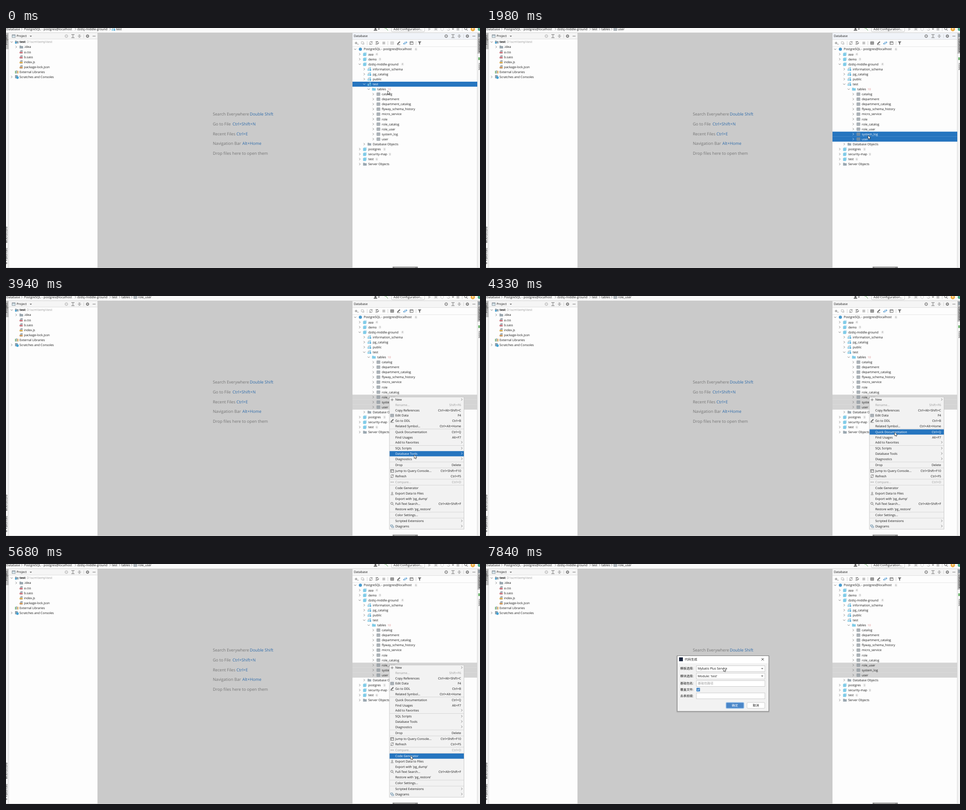
Animation of 1052 by 532 pixels, one loop 8 s. Source, as an HTML page:

```html
<!DOCTYPE html>
<html lang="en">
<head>
<meta charset="utf-8">
<title>Database tool window</title>
<style>
html, body { margin: 0; width: 100%; height: 100%; overflow: hidden; background: #fff; }
svg { display: block; width: 1052px; height: 532px; }
text { font: 6.95px "Open Sans", "Noto Sans CJK SC", "Noto Sans CJK", sans-serif; fill: #161616; text-rendering: geometricPrecision; white-space: pre; }
.hint { font-size: 9.1px; fill: #757575; }
.key { fill: #2f6cab; }
.gray { fill: #9a9a9a; }
.end { text-anchor: middle; }
.right { text-anchor: end; }
.bg { fill: none; }
.sel .bg { fill: #2675bf; }
.dim .bg { fill: #d4d4d4; }
.sel text { fill: #fff; }
.sel .arrow { stroke: #d5e5f4; }
.sel .pic { stroke: #c3d4e4; }
.off text { fill: #9a9a9a; }
.arrow { fill: none; stroke: #6e6e6e; stroke-width: .9; }
.pic { fill: none; stroke: #6e6e6e; stroke-width: 1; }
</style>
</head>
<body>
<svg id="stage" viewBox="0 0 1052 532" xmlns="http://www.w3.org/2000/svg"></svg>
<script>
const LOOP = 8000;
const BLUE = '#3d8fc9', SKY = '#7fcbe8', GRAY = '#6e6e6e', PALE = '#c4c4c4';

// Drawing helpers: each returns SVG markup
const rect = (x, y, w, h, fill, more = '') => `<rect x="${x}" y="${y}" width="${w}" height="${h}" fill="${fill}" ${more}/>`;
const text = (x, y, s, cls = '', more = '') => `<text x="${x}" y="${y + 2.45}" class="${cls}" ${more}>${s}</text>`;
const pic = (x, y, d, color = '', more = '') =>
  `<path class="pic" transform="translate(${x} ${y})" d="${d}" ${color && `style="stroke:${color}"`} ${more}/>`;
const solid = (x, y, d, fill) => `<path transform="translate(${x} ${y})" d="${d}" fill="${fill}"/>`;
const vline = (x, y, h, fill = '#d2d2d2') => rect(x, y, 1, h, fill);
const hline = (x, y, w, fill = '#d2d2d2') => rect(x, y, w, 1, fill);
const arrow = (x, y, open) =>
  `<path class="arrow" transform="translate(${x} ${y})" d="${open ? 'M-2.3 -1.2L0 1.2L2.3 -1.2' : 'M-1.2 -2.4L1.2 0L-1.2 2.4'}"/>`;
const caret = (x, y, fill = GRAY) => solid(x, y, 'M-2.5 -1.3H2.5L0 1.5Z', fill);
const side = (x, y, angle, s) => `<text class="end" transform="translate(${x} ${y}) rotate(${angle})">${s}</text>`;

const icons = {
  table: (x, y, c) => pic(x, y, 'M-3.5 -3H3.5V3H-3.5ZM-3.5 -1.2H3.5M-3.5 .9H3.5M-1.2 -3V3M1.2 -3V3', c || '#8a949c', 'stroke-width=".8"'),
  folder: (x, y, c = '#9aa7b0') => solid(x, y, 'M-4 -3H-1L0 -2H4V3.2H-4Z', c),
  base: (x, y) => rect(x - 2.5, y - 4, 6.5, 6.5, '#b7dff0') + rect(x - 4, y - 2.5, 6.5, 6.5, SKY),
  schema: (x, y) => rect(x - 4, y, 3.3, 3.3, SKY) + rect(x + .3, y, 3.6, 3.3, '#52a9d6') +
    rect(x + .3, y - 3.8, 3, 3, SKY) + pic(x, y, 'M-2.5 -.5V-2.3H0', '#8a949c'),
  server: (x, y) => `<circle cx="${x}" cy="${y}" r="3.5" fill="#4a9cd0"/>`,
  libs: (x, y) => rect(x - 4, y - 2.5, 2, 6, '#7ab87a') + rect(x - 1.4, y - 3.5, 2, 7, '#8ea0ad') + rect(x + 1.2, y - 2.5, 2.4, 6, '#e0b060'),
  scratch: (x, y) => rect(x - 4, y - 4, 6, 7, '#8ea0ad') + `<circle cx="${x + 1.5}" cy="${y + 1.5}" r="2.8" fill="#45a3d4"/>`,
  file: (x, y, c) => solid(x, y, 'M-1 -4H3V3.7H-3V-2Z', '#aab3ba') + rect(x - 4, y, 7, 3, c),
  target: (x, y, c) => pic(x, y, 'M-3.2 0A3.2 3.2 0 1 0 3.2 0A3.2 3.2 0 1 0 -3.2 0M-3 0H-1M1 0H3M0 -3V-1M0 1V3', c),
  expand: (x, y) => pic(x, y, 'M-3.5 -3.5H3.5M-3.5 3.5H3.5M-1.6 -.5L0 -2L1.6 -.5M-1.6 .5L0 2L1.6 .5'),
  collapse: (x, y) => pic(x, y, 'M-3.5 0H3.5M-1.6 -3.6L0 -1.8L1.6 -3.6M-1.6 3.6L0 1.8L1.6 3.6'),
  gear: (x, y) => `<circle cx="${x}" cy="${y}" r="2.2" class="pic" style="stroke-width:1.5"/>` +
    pic(x, y, 'M0 -4V-2.5M0 4V2.5M-4 0H-2.5M4 0H2.5M-2.7 -2.7L-1.8 -1.8M2.7 2.7L1.8 1.8M-2.7 2.7L-1.8 1.8M2.7 -2.7L1.8 -1.8'),
  minus: (x, y) => pic(x, y, 'M-3.3 0H3.3'),
  refresh: (x, y) => pic(x, y, 'M-3 -.5A3 3 0 0 1 2.5 -1.8M3 .5A3 3 0 0 1 -2.5 1.8M2.8 -3.6V-1.4H.6M-2.8 3.6V1.4H-.6'),
  pencil: (x, y) => solid(x, y, 'M-3 1L2 -4L3.6 -2.4L-1.4 2.6L-3.4 3Z', GRAY) + hline(x - 3.5, y + 3.2, 7, GRAY),
  console: (x, y) => pic(x, y, 'M-3.5 -3H3.5V3.2H-3.5ZM-3.5 -1.6H3.5M-2 0L-.7 .9L-2 1.9'),
  search: (x, y, c) => pic(x, y, 'M-3 -1A2.4 2.4 0 1 0 1.8 -1A2.4 2.4 0 1 0 -3 -1M1.2 .8L3.6 3.4', c),
  save: (x, y) => pic(x, y, 'M-3 3H3M0 -3.5V1M-2 -1L0 1L2 -1'),
  plus: (x, y) => pic(x, y, 'M-3 0H3M0 -3V3'),
  diagram: (x, y) => pic(x, y, 'M-3.5 -3H1V0H-3.5ZM-1 0V3H3.5V0H1', '#6d93ad')
};

function frame() {
  return rect(0, 0, 1052, 532, '#fdfdfd') +
    rect(203, 11, 566, 520, '#cacaca') +
    rect(0, 0, 1052, 10, '#fafafa') + hline(0, 10, 1052) +
    rect(0, 11, 6, 520, '#f4f4f4') + rect(0, 11, 6, 36, '#bebebe') + vline(5.5, 11, 520) +
    rect(1046, 11, 6, 520, '#f4f4f4') + rect(1046, 11, 6, 46, '#bebebe') + vline(1045.5, 11, 520) +
    side(3, 26, -90, 'Project') + side(3, 455, -90, 'Structure') + side(3, 502, -90, 'Favorites') +
    rect(0, 471, 3, 2, GRAY) + rect(0, 474, 3, 2, GRAY) + solid(1, 521, 'M-1 -3L0 -1L3 0L0 1L1 3L-2 1Z', GRAY) +
    side(1048.5, 39, 90, 'Database') + rect(1048, 13, 4, 7, '#8a949c') +
    rect(1048, 65, 4, 6, '#7ab87a') + side(1048.5, 85, 90, 'Tools') +
    hline(0, 531, 1052) + rect(858, 529, 56, 3, '#8b8b8b') + rect(862, 530, 46, 2, '#a9a9a9');
}

function toolbar() {
  const play = (x, d) => pic(x, 2.5, d, PALE);
  return solid(820, 2, 'M-4 4Q-4 1 0 1Q4 1 4 4ZM-2 -2H2V1H-2Z', GRAY) + caret(827.5, 2.5) +
    pic(844, 2, 'M-3.5 -1L0 -3M-1 -2L3.5 3.5', '#4f9a4f', 'style="stroke-width:2"') +
    rect(855.5, -5, 73.5, 13.2, '#fff', 'rx="2" stroke="#c4c4c4"') + text(860, 2.5, 'Add Configuration...') +
    solid(940, 2.5, 'M-2.5 -3.5L3 0L-2.5 3.5Z', PALE) + `<circle cx="954" cy="2.5" r="2.7" fill="${PALE}"/>` +
    play(954, 'M-4 -2L4 3M4 -2L-4 3') + play(968, 'M-3 -3H3V1L0 4L-3 1Z') + play(982, 'M-3 0A3 3 0 1 0 3 0M-1 -3L3 0L-1 3') +
    caret(992, 2.5) + rect(1000, -.5, 6, 6, PALE) + vline(1012, 0, 7) + icons.search(1021, 2.5, '#444') +
    `<circle cx="1036" cy="2.5" r="4.7" fill="#f0a732"/>` + pic(1036, 2.5, 'M0 2.5V-2.3M-2 -.3L0 -2.3L2 -.3', '#fff') +
    `<circle cx="1051" cy="2.5" r="4" fill="#4fae8b"/>`;
}

function crumbs(last) {
  const sep = x => arrow(x, 2.5);
  const head = text(.5, 2.5, 'Database') + sep(35) + text(40, 2.5, 'PostgreSQL - postgres@localhost') +
    sep(154) + text(158, 2.5, 'dzdsj-middle-ground') + sep(231);
  if (!last) return head + icons.schema(238.5, 2.5) + text(244.5, 2.5, 'test');
  return head + text(235, 2.5, 'test') + sep(252) + text(256, 2.5, 'tables') + sep(279) +
    icons.table(287, 2.5) + text(293, 2.5, last);
}

function project() {
  const items = [
    ['.idea', 1, 'folder'], ['a.css', 1, 'file', '#d4777f'], ['b.sass', 1, 'file', '#d4777f'],
    ['index.js', 1, 'file', '#e3b04f'], ['package-lock.json', 1, 'file', '#d59a58'],
    ['External Libraries', 0, 'libs'], ['Scratches and Consoles', 0, 'scratch']
  ];
  let out = rect(6, 11, 197, 13, '#f5f5f5') + hline(6, 24, 197, '#dedede') +
    rect(13, 14.5, 8, 7, '#8a949c') + rect(14, 16.5, 6, 4, '#d8e7ee') + text(23.5, 18, 'Project') + caret(55, 18.3) +
    icons.target(134, 18, '#b5b5b5') + icons.expand(148.5, 18) + icons.collapse(163, 18) + vline(172, 14, 8) +
    icons.gear(181, 18) + icons.minus(195.5, 18) +
    arrow(12.5, 31, true) + icons.folder(24, 31) + rect(20, 31, 3.5, 3.5, '#45a3d4') +
    text(30, 31, 'test', '', 'font-weight="700" style="font-weight:700"') + text(46, 31, 'D:\\scm\\temp\\test', 'gray');
  items.forEach(([name, level, icon, color], i) => {
    const y = 42 + i * 11.07, x = 10 * level;
    if (icon === 'folder' || icon === 'scratch') out += arrow(12.5 + x, y);
    out += icons[icon](24 + x, y, color) + text(30 + x, y, name);
  });
  return out;
}

function databaseBar() {
  const y = 33.3;
  return rect(769, 11, 277, 14, '#f5f5f5', 'id="head"') + text(772, 18, 'Database') +
    icons.target(977, 18) + icons.expand(992, 18) + icons.collapse(1006, 18) + vline(1015, 14, 8) +
    icons.gear(1024, 18) + icons.minus(1038.5, 18) +
    hline(769, 25, 277, '#dedede') + hline(769, 41, 277, '#e6e6e6') +
    icons.plus(777, y) + solid(781, y + 3, 'M-1.5 -.8H1.5L0 1Z', GRAY) +
    pic(791.5, y, 'M-3 -3H1.5V1.5H-3ZM-1 3H3V-1', '#b9b9b9') + vline(801, 29, 9) +
    icons.refresh(810, y) + pic(824, y, 'M-3.5 -3H2M-3.5 0H0M-3.5 3H-1M0 3L3.5 -1', '', 'style="stroke-width:1.5"') +
    rect(835.5, y - 3, 6, 6, PALE) + vline(847, 29, 9) +
    `<g id="edit">${icons.table(857, y, 'currentColor')}</g>` + icons.pencil(871.5, y) +
    pic(886, y, 'M-4 1.5H2M-2 -.5L-4 1.5L-2 3.5M4 -1.5H-2M2 -3.5L4 -1.5L2 .5', '#2f86c9', 'style="stroke-width:1.3"') +
    icons.console(900, y) + vline(909.5, 29, 9) + solid(918, y, 'M-3.8 -3.5H3.8L1 0V4L-1 3V0Z', GRAY);
}

// name, level, icon, open (undefined = closed), badge, badge x
const nodes = [
  ['PostgreSQL - postgres@localhost', 0, 'server', true, 6, 910], ['aaa', 1, 'base', false, 4, 823],
  ['demo', 1, 'base', false, 3, 830], ['dzdsj-middle-ground', 1, 'base', true, 4, 880],
  ['information_schema', 2, 'schema'], ['pg_catalog', 2, 'schema'], ['public', 2, 'schema'], ['test', 2, 'schema', true],
  ['tables', 3, 'folder', true],
  ...['catalog', 'department', 'department_catalog', 'flyway_schema_history', 'micro_service', 'role',
    'role_catalog', 'role_user', 'system_log', 'user'].map(n => [n, 4, 'table']),
  ['Database Objects', 2, 'folder'], ['postgres', 1, 'base', false, 3, 840],
  ['security-map', 1, 'base', false, 3, 852], ['test', 1, 'base', false, 6, 823], ['Server Objects', 1, 'folder']
];

function tree() {
  return nodes.map(([name, level, icon, open, count, bx], i) => {
    const y = 47 + i * 11.075, x = level * 10;
    const badge = count ? rect(bx - 3.2, y - 3.2, 6.4, 6.6, '#f0f0f0', 'rx="2"') + text(bx, y - .3, count, 'gray end', 'style="font-size:5.8px"') : '';
    const total = name === 'tables' ? text(847, y, '10', '', 'style="fill:#d98080;font-size:6.3px"') : '';
    return `<g class="row"><rect class="bg" x="769" y="${y - 5.55}" width="277" height="11.1"/>` +
      arrow(775 + x, y, open) + icons[icon](786.5 + x, y, name === 'tables' ? SKY : undefined) +
      text(794 + x, y, name) + badge + total + '</g>';
  }).join('');
}

// name, shortcut or '>' for a submenu, icon; '-' marks a separator above
const entries = [
  ['New', '>', 'plus'], ['Rename...', 'Shift+F6'], ['Copy References', 'Ctrl+Alt+Shift+C'],
  ['Edit Data', 'F4', 'table'], ['Go to DDL', 'Ctrl+B', 'pencil'], ['Related Symbol...', 'Ctrl+Alt+Home'],
  ['Quick Documentation', 'Ctrl+Q', '', '-'], ['Find Usages', 'Alt+F7'], ['Add to Favorites', '>'],
  ['SQL Scripts', '>', '', '-'], ['Database Tools', '>'], ['Diagnostics', '>'],
  ['Drop', 'Delete', '', '-'], ['Jump to Query Console...', 'Ctrl+Shift+F10', 'console', '-'], ['Refresh', 'Ctrl+F5', 'refresh'],
  ['Compare...', 'Ctrl+D', 'compare', '-'], ['Code Generator', '', '', '-'], ['Export Data to Files', '', 'save'],
  ["Export with 'pg_dump'", ''], ['Full-Text Search...', 'Ctrl+Alt+Shift+F', 'search'], ["Restore with 'pg_restore'", ''],
  ['Color Settings...', '', '', '-'], ['Scripted Extensions', '>', '', '-'], ['Diagrams', '>', 'diagram']
];
icons.compare = (x, y) => pic(x, y, 'M-4 0H-1M-2.2 -1.5L-.7 0L-2.2 1.5M4 0H1M2.2 -1.5L.7 0L2.2 1.5', '#b0b0b0');

function menu() {
  let y = 230 - 11.64;
  return rect(851, 224, 165.5, 293, '#f2f2f2', 'stroke="#bdbdbd" stroke-width=".8"') + entries.map(([name, key, icon, sep]) => {
    y += 11.64 + (sep ? 1.6 : 0);
    const off = key === 'Shift+F6' || key === 'Ctrl+D';
    return (sep ? hline(852, y - 7.1, 164, '#d5d5d5') : '') +
      `<g class="entry${off ? ' off' : ''}"><rect class="bg" x="851.4" y="${y - 5.8}" width="164.8" height="11.6"/>` +
      (icon ? icons[icon](857, y) : '') + text(864, y, name) +
      (key === '>' ? arrow(1011.5, y - .5) : text(1010, y, key, 'right')) + '</g>';
  }).join('');
}

function dialog() {
  const field = y => rect(467, y - 6.5, 152, 13, '#fff', 'stroke="#c6c6c6" stroke-width=".9"');
  const label = (y, s) => text(431, y, s);
  return rect(422.5, 202.5, 207, 127, '#000', 'opacity=".10" rx="2"') +
    rect(424.4, 203.4, 203.2, 123.2, '#f2f2f2', 'stroke="#777" stroke-width=".9"') +
    rect(425, 204, 202, 16, '#fff') + rect(428.5, 207, 8.5, 8.5, '#18233c') + text(441, 211.5, '代码生成') +
    pic(614, 211.3, 'M-2.6 -2.6L2.6 2.6M2.6 -2.6L-2.6 2.6', '#222', 'stroke-width=".9"') +
    label(232, '模板选择:') + field(232) + text(470, 232, 'Mybatis Plus Service') + caret(613, 232) +
    label(248.5, '模块选择:') + field(248.5) + text(470, 248.5, "Module: 'test'") + caret(613, 248.5) +
    label(265, '基础包名:') + field(265) + text(470, 265, '基础包路径', 'gray') +
    label(278.5, '覆盖文件:') + rect(467, 274.5, 8, 8, '#4688c9', 'rx="1"') + pic(471, 278.5, 'M-2.2 0L-.6 1.8L2.3 -1.8', '#fff') +
    label(292.3, '去表前缀:') + field(292.3) +
    rect(532.8, 307, 39.5, 13, '#4a86c8', 'rx="2" stroke="#9cc3eb" stroke-width="1.6"') +
    text(552.5, 313.5, '确定', 'end', 'style="fill:#fff"') +
    rect(579.3, 307, 39.5, 13, '#fff', 'rx="2" stroke="#c6c6c6" stroke-width=".9"') + text(599, 313.5, '取消', 'end');
}

function hints() {
  const lines = [['Search Everywhere', 'Double Shift', 541], ['Go to File', 'Ctrl+Shift+N', 502.7], ['Recent Files', 'Ctrl+E', 511.5],
    ['Navigation Bar', 'Alt+Home', 524.5], ['Drop files here to open them', '', 0]];
  return lines.map(([s, key, x], i) => {
    const y = 191.8 + i * 21.65;
    return text(459, y, s, 'hint') + text(x, y, key, 'hint key');
  }).join('');
}

// Step tables: the last entry whose time has passed applies
const selection = [[0, [7]], [1160, [18]], [1980, [17, 18]], [2990, [16, 17, 18]]];
const trail = [[0, ''], [1560, 'user'], [2350, 'system_log'], [3700, 'role_user']];
const hover = [[0, -1], [3700, 3], [3820, 8], [3940, 10], [4090, 11], [4210, 8], [4330, 6], [4450, 8],
  [4590, 10], [4720, 12], [4850, 13], [5140, 14], [5290, -1], [5560, 16]];
const fade = [[0, 0, 1], [6790, .15, .96], [6920, .55, .98], [7040, .93, .995], [7180, 1, 1]];
const pointer = [[0, 847, 139], [120, 852, 142], [250, 860, 145], [370, 866, 147], [510, 859, 164],
  [660, 852, 192], [790, 846, 226], [910, 844, 247], [1560, 846, 243], [1700, 848, 238],
  [2350, 849, 233], [2470, 850, 228], [2590, 850, 225], [2740, 851, 224], [3700, 868, 264], [3820, 893, 325],
  [3940, 906, 352], [4090, 908, 357], [4210, 908, 326], [4330, 907, 302], [4450, 907, 322], [4590, 906, 347],
  [4720, 904, 374], [4850, 902, 391], [5140, 901, 405], [5290, 899, 412], [5440, 898, 417], [5560, 898, 422],
  [5680, 898, 425], [6790, 770, 362], [6920, 619, 290], [7040, 600, 283], [7180, 585, 279], [7330, 570, 263],
  [7460, 560, 254], [7600, 545, 244], [7720, 533, 235], [7840, 527, 230]];
const at = (table, t) => table.findLast(step => step[0] <= t);

const stage = document.getElementById('stage');
stage.innerHTML = frame() + toolbar() + '<g id="crumbs"></g>' + project() + databaseBar() + tree() + hints() +
  `<g id="menu">${menu()}</g><g id="dialog">${dialog()}</g>` +
  '<g id="pointer"><path id="tip" d="M0 0V8.2L1.9 6.5L3.1 9.2L4.5 8.6L3.4 6H6Z" fill="#fff" stroke="#111" stroke-width=".7"/>' +
  '<path id="beam" d="M-1.5 -4H1.5M0 -4V4M-1.5 4H1.5" fill="none" stroke="#111" stroke-width=".9"/></g>';

const $ = id => document.getElementById(id);
const rows = [...document.querySelectorAll('.row')];
const choices = [...document.querySelectorAll('.entry')];
const show = (el, on) => { el.style.display = on ? '' : 'none'; };
let shown = null;

function paint(t) {
  const [, picked] = at(selection, t);
  rows.forEach((r, i) => r.setAttribute('class', 'row' + (picked.includes(i) ? (t < 3400 ? ' sel' : ' dim') : '')));
  const [, active] = at(hover, t);
  choices.forEach((c, i) => c.classList.toggle('sel', i === active));
  show($('menu'), t >= 3400 && t < 6670);

  const [, last] = at(trail, t);
  if (last !== shown) $('crumbs').innerHTML = crumbs(shown = last);
  $('edit').style.color = t < 1560 ? '#c9c9c9' : GRAY;
  $('head').setAttribute('fill', t < 3400 ? '#f0f3f8' : '#f5f5f5');

  const [, alpha, size] = at(fade, t);
  $('dialog').setAttribute('opacity', alpha);
  $('dialog').setAttribute('transform', `translate(526 265) scale(${size}) translate(-526 -265)`);

  const [, x, y] = at(pointer, t);
  const beam = t >= 6920 && t < 7040;
  $('pointer').setAttribute('transform', `translate(${x} ${y})`);
  show($('beam'), beam);
  show($('tip'), !beam);
}

const start = performance.now();
function tick() {
  paint((performance.now() - start) % LOOP);
  requestAnimationFrame(tick);
}
tick();
</script>
</body>
</html>
```
